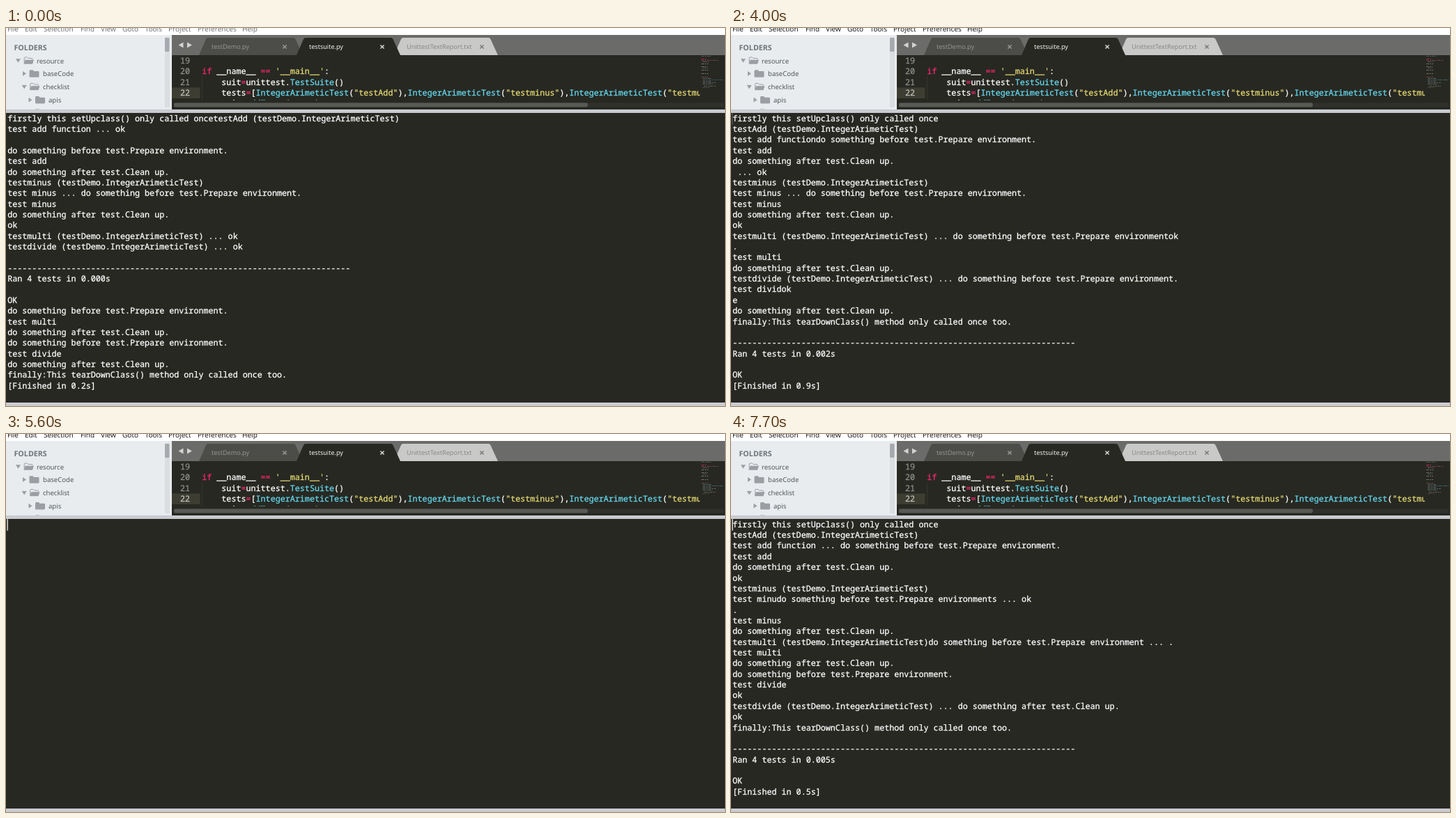
Recreate the animation shown at these times as an HTML page. Size 1032x543 px, loop 8000 ms.

```html
<!DOCTYPE html>
<html lang="en">
<head>
<meta charset="utf-8">
<title>Test run</title>
<style>
html, body { margin: 0; width: 100%; height: 100%; overflow: hidden; background: #272822; }
svg { display: block; width: 1032px; height: 543px; text-rendering: geometricPrecision; }
text { white-space: pre; }
.mono { font: 11.727px "Noto Sans Mono", "DejaVu Sans Mono", monospace; color: #fff; }
.mono text, .mono tspan { fill: currentColor; stroke: currentColor; stroke-width: .28px; }
.ui { font: 9.15px "Open Sans", "Noto Sans", sans-serif; }
.menu { font-size: 10.1px; }
.tree { font-size: 9.6px; fill: #484d52; }
.k { color: #f92672; } .f { color: #66d9ef; } .s { color: #e6db74; }
</style>
</head>
<body>
<svg viewBox="0 0 1032 543">
  <defs>
    <clipPath id="view"><path d="M238 39H996V104H238Z"/></clipPath>
    <path id="tab" d="M0 25L10 2Q11 0 13 0H135.5Q137.5 0 138.5 2L149 25Z"/>
    <path id="cross" d="M-2.6-2.6L2.6 2.6M2.6-2.6L-2.6 2.6" stroke-width="1.4"/>
    <path id="closed" d="M0 1.5Q0 0 1.5 0H5L6.5 1.7H12.5Q14 1.7 14 3V9Q14 10.5 12.5 10.5H1.5Q0 10.5 0 9Z"/>
    <g id="open"><path d="M1.2 9V1.5Q1.2 .5 2.4 .5H5.5L7 2H12Q13 2 13 3.5V4" fill="none" stroke="#9b9fa4"/><path d="M2.6 4.3H15L13 10.3H.5Z"/></g>
    <path id="right" d="M0 0L5 3.5L0 7Z"/>
    <path id="down" d="M0 0H7L3.5 5.5Z"/>
  </defs>
  <path d="M0 0H1032V10H0Z" fill="#fff"/>
  <g id="menu" class="ui menu"></g>

  <path d="M0 10H238V118H0Z" fill="#e8ecee"/>
  <path d="M228 13H235V114H228Z" fill="#dadee1"/>
  <rect x="228" y="14" width="6.5" height="20" rx="1.5" fill="#a6aaae"/>
  <g class="ui tree">
    <text x="11.5" y="32.3" style="font-size:10.7px;font-weight:700;fill:#70767b">FOLDERS</text>
    <text x="44" y="50.5">resource</text>
    <text x="53" y="69.3">baseCode</text>
    <text x="53" y="88">checklist</text>
    <text x="61" y="106.7">apis</text>
  </g>
  <g fill="#9b9fa4">
    <use href="#down" x="14" y="44.3"/><use href="#open" x="25" y="41.5"/>
    <use href="#right" x="24" y="62"/><use href="#closed" x="33.5" y="60.3"/>
    <use href="#down" x="22.7" y="82"/><use href="#open" x="33.5" y="79"/>
    <use href="#right" x="32.5" y="99.7"/><use href="#closed" x="42" y="98"/>
    <path d="M42 116.5H48V118H42Z"/>
  </g>

  <path d="M238 10H1032V39H238Z" fill="#6b6c69"/>
  <path d="M238 39H1032V118H238Z" fill="#272822"/>
  <path d="M254.5 20.5V28.5L247.5 24.5ZM260 20.5V28.5L267 24.5Z" fill="#d3d4d1"/>
  <use href="#tab" x="277" y="14" fill="#4c4d49"/>
  <use href="#tab" x="557" y="14" fill="#c9cac8"/>
  <use href="#tab" x="417" y="14" fill="#272822"/>
  <g class="ui">
    <text x="295" y="30.3" fill="#989994">testDemo.py</text>
    <text x="435" y="30.3" fill="#fff">testsuite.py</text>
    <text x="575" y="30.3" fill="#838480">UnittestTextReport.txt</text>
  </g>
  <use href="#cross" x="400" y="27" stroke="#9a9b97"/>
  <use href="#cross" x="540" y="27" stroke="#deded9"/>
  <use href="#cross" x="683" y="27" stroke="#777874"/>

  <path d="M238 85.5H278.5V101H238Z" fill="#3e3d32"/>
  <path d="M281.5 70V104" stroke="#46453c" stroke-dasharray="1 1"/>
  <g id="code" class="mono" clip-path="url(#view)"></g>
  <path d="M241 107.5H1030V113.5H241Z" fill="#30312c"/>
  <rect x="241" y="107.5" width="594" height="6" rx="2" fill="#595a56"/>
  <g id="map"></g>

  <path d="M0 117H1032V122H0ZM0 538H1032V543H0Z" fill="#c9cbcf"/>
  <g id="out" class="mono"></g>
  <path id="caret" d="M0 0H1.3V16.5H0Z" fill="#f8f8f0"/>
</svg>
<script>
const $ = id => document.getElementById(id);
const LOOP = 8000, ROW = 15.36;
const text = (x, y, s) => `<text x="${x}" y="${y}">${s}</text>`;

const items = ['File', 2, 'Edit', 27, 'Selection', 54, 'Find', 107, 'View', 136,
  'Goto', 167, 'Tools', 199.5, 'Project', 233, 'Preferences', 275, 'Help', 339];
$('menu').innerHTML = items.map((s, i) => i % 2 ? '' : text(items[i + 1], 5.2, s)).join('');

// Source code: k keyword, f function, s string
const mark = (c, s) => `<tspan class="${c}">${s}</tspan>`;
const call = s => mark('f', 'IntegerArimeticTest') + '(' + mark('s', `"${s}"`) + '),';
const code = [
  '',
  mark('k', 'if') + ' __name__ ' + mark('k', '==') + ' ' + mark('s', "'__main__'") + ':',
  '    suit' + mark('k', '=') + 'unittest.' + mark('f', 'TestSuite') + '()',
  '    tests' + mark('k', '=') + '[' + ['testAdd', 'testminus', 'testmulti'].map(call).join(''),
  '    suit.' + mark('f', 'addTests') + '(tests)'
];
$('code').innerHTML = code.map((s, i) => {
  const y = 50.8 + i * ROW;
  const num = i < 4 ? `<text x="250" y="${y}" style="color:${i == 3 ? '#c2c2ba' : '#8f908a'}">${19 + i}</text>` : '';
  return num + text(281.2, y, s);
}).join('');

// Minimap: y, x, width, colour
const map = [
  [40, 998, 14, '#777'], [44, 998, 8, '#f92672'], [46, 998, 25, '#a05068'], [48, 1000, 9, '#888'],
  [51, 998, 10, '#999'], [55, 998, 9, '#999'], [57, 1000, 7, '#776'], [60, 998, 10, '#999'],
  [65, 998, 10, '#999'], [70, 998, 10, '#a05068'], [72, 1000, 13, '#888'], [74, 1000, 30, '#4d8d99'],
  [76, 1000, 12, '#888'], [78, 1000, 19, '#6d8a8e'], [80, 1000, 14, '#888'], [83, 1002, 17, '#887'], [85, 1000, 10, '#666']
];
$('map').innerHTML = map.map(([y, x, w, c]) =>
  `<path d="M${x} ${y + .5}h${w}" stroke="${c}" stroke-opacity=".6" stroke-dasharray="4 1 2 1"/>`).join('');
const mapRow = $('map').children[11];

// Console output
const cls = '(testDemo.IntegerArimeticTest';
const before = 'do something before test.Prepare environment';
const after = 'do something after test.Clean up';
const once = 'firstly this setUpclass() only called once';
const last = 'finally:This tearDownClass() method only called once too.';
const ran = s => ['', '-'.repeat(70), `Ran 4 tests in ${s}s`, '', 'OK'];
const done = s => `[Finished in ${s}s]`;
const runs = {
  a: [once + `testAdd ${cls})`, 'test add function ... ok', '', before + '.', 'test add', after + '.',
    `testminus ${cls})`, `test minus ... ${before}.`, 'test minus', after + '.', 'ok',
    `testmulti ${cls}) ... ok`, `testdivide ${cls}) ... ok`, ...ran('0.000'),
    before + '.', 'test multi', after + '.', before + '.', 'test divide', after + '.', last, done(0.2)],
  b: [once, `testAdd ${cls})`, `test add function${before}.`, 'test add', after + '.', ' ... ok',
    `testminus ${cls})`, `test minus ... ${before}.`, 'test minus', after + '.', 'ok',
    `testmulti ${cls}) ... ${before}ok`, '.', 'test multi', after + '.',
    `testdivide ${cls}) ... ${before}.`, 'test dividok', 'e', after + '.', last, ...ran('0.002'), done(0.9)],
  c: [once, `testAdd ${cls})`, `test add function${before}.`, 'test add', after + '.', ' ... ok',
    `testminus ${cls})`, `test minu${before}.`, 'test minus', `s ... ${after}ok`, '.',
    `testmulti ${cls})${before} ... .`, 'test multi', after + '.', 'ok',
    `testdivide ${cls}${before}) ... .`, 'test divide', after + '.', 'ok', last, ...ran('0.003'), done(0.2)],
  d: [once, `testAdd ${cls})`, `test add function ... ${before}.`, 'test add', after + '.', 'ok',
    `testminus ${cls})`, `test minu${before}s ... ok`, '.', 'test minus', after + '.',
    `testmulti ${cls})${before} ... .`, 'test multi', after + '.', before + '.', 'test divide', 'ok',
    `testdivide ${cls}) ... ${after}.`, 'ok', last, ...ran('0.005'), done(0.5)]
};
$('out').innerHTML = Object.entries(runs).map(([id, lines]) =>
  `<g id="run-${id}">${lines.map((s, i) => text(2.2, 133.7 + i * ROW, s)).join('')}</g>`).join('');

// [start, run on screen]; an empty name is a cleared console
const shows = [[0, 'a'], [2200, ''], [3000, 'b'], [4600, ''], [5400, 'c'], [5600, ''],
  [5800, 'c'], [6000, ''], [6200, 'c'], [6300, ''], [7600, 'd']];
// [start, from, to, steps of 100 ms]
const blinks = [[0, 0, 0, 1], [600, 0, 1, 2], [1100, 1, 0, 3], [1700, 0, 1, 3], [2100, 1, 0, 2],
  [2600, 0, 1, 2], [3000, 1, 0, 2], [3400, 0, 1, 3], [4000, .5, 0, 2], [4400, 0, 1, 3],
  [5100, 1, 0, 3], [5600, 1, 1, 1], [6800, 1, 0, 3], [7400, 0, 1, 3]];
const at = (list, t) => list.findLast(e => e[0] <= t);

function draw(now) {
  const t = now % LOOP;
  const show = at(shows, t)[1];
  for (const id in runs) $('run-' + id).style.display = id === show ? '' : 'none';
  const [start, from, to, steps] = at(blinks, t);
  const step = Math.min(steps, Math.floor((t - start) / 100) + 1);
  $('caret').style.opacity = from + (to - from) * step / steps;
  $('caret').setAttribute('transform', t < 2200 ? 'translate(233.8 199)' : 'translate(1.5 122.3)');
  $('menu').setAttribute('fill', t < 600 ? '#6d6d6d' : '#111');
  mapRow.style.opacity = t < 200 ? .7 : 1;
  requestAnimationFrame(draw);
}
draw(0);
</script>
</body>
</html>
```
